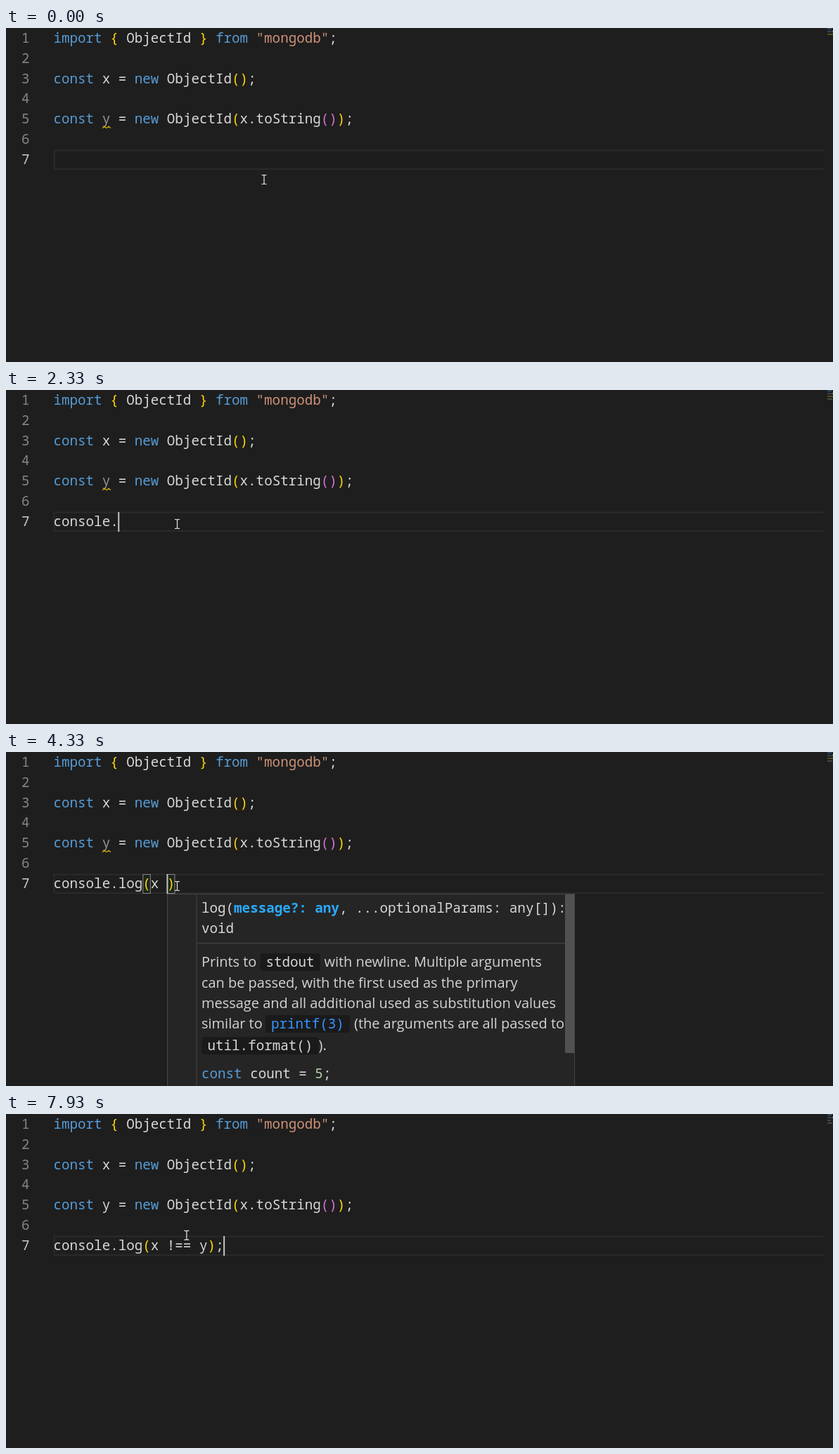
An HTML page for the animation above (8000 ms loop, 1176 by 476 pixels).

```html
<!DOCTYPE html>
<html lang="en">
<head>
<meta charset="utf-8">
<title>Editor session</title>
<style>
html, body { margin: 0; width: 100%; height: 100%; overflow: hidden; background: #1e1e1e; }
svg { display: block; width: 1176px; height: 476px; }
text { white-space: pre; fill: #d4d4d4; }
.mono { font-family: "Noto Sans Mono", "DejaVu Sans Mono", monospace; font-size: 19.22px; font-weight: 500; }
.prose { font-family: "Open Sans", "Noto Sans", sans-serif; font-size: 19.95px; }
.small { font-size: 16.4px; font-weight: 400; }
</style>
</head>
<body>
<svg id="stage" viewBox="0 0 1176 476"></svg>
<script>
const FPS = 15, FRAMES = 120, LEFT = 67.5, CHAR = 11.53, ROW = 28.8;
const FG = '#d8d8d8', BLUE = '#569cd6', GOLD = '#ffd700', PINK = '#da70d6',
      STRING = '#ce9178', MATCH = '#2aaaff', PANEL = '#252526', EDGE = '#454545', THUMB = '#515151';

// [frame, text of line 7]
const typed = [[0, ''], [20, 'c'], [22, 'co'], [24, 'con'], [27, 'cons'], [30, 'conso'],
  [32, 'consol'], [33, 'console'], [35, 'console.'], [40, 'console.l'], [43, 'console.lo'],
  [44, 'console.log'], [49, 'console.log()'], [58, 'console.log(x)'], [63, 'console.log(x )'],
  [71, 'console.log(x !)'], [75, 'console.log(x !=)'], [77, 'console.log(x !==)'],
  [78, 'console.log(x !== )'], [82, 'console.log(x !== y)'], [100, 'console.log(x !== y);']];

// [frame, column the open panel hangs from], 0 = closed
const panels = [[0, 0], [23, 2], [25, 3], [28, 4], [31, 5], [33, 7], [34, 0], [37, 8], [41, 9],
  [45, 11], [49, 0], [51, 12], [60, 13], [65, 14], [72, 15], [76, 16], [79, 18], [83, 19],
  [93, 20], [97, 0]];

const mouseSteps = [[0, [367, 216]], [1, [335, 211]], [2, [300, 206]], [3, [268, 201]],
  [7, [255, 196]], [8, [243.5, 191]]];

const globals = [['console', 'variable'], ['const', 'keyword'], ['ConstantSourceNode', 'variable'],
  ...['ConnectionCheckOutStartedEvent', 'ConnectionClosedEvent', 'CommandStartedEvent',
    'CommandSucceededEvent', 'ConnectionPoolClosedEvent'].map(s => [s, 'class', 'mongodb']),
  ['CountQueuingStrategy', 'variable'], ['useContextSnippet', 'snippet', 'useContext']];

const members = ['log', 'timeLog', 'clear', 'table', 'dirxml', 'profile', 'profileEnd', 'timeline',
  'groupCollapsed', 'assert', 'count', 'debug'].map(s => [s, 'method']);

const iconColor = { variable: '#75beff', keyword: '#c5c5c5', class: '#ee9d28',
  snippet: '#c5c5c5', method: '#b180d7' };
const iconPath = {
  variable: 'M-5-6H-9V6H-5M5-6H9V6H5M-5-1L1-4L5-2V2L-1 5L-5 3ZM-5-1L-1 1L5-2M-1 1V5',
  keyword: 'M-9-6H0M3-6H9M-9-2H2M5-2H9M-9 2H-3M0 2H9M-9 6H4M7 6H9',
  class: 'M-9-3L-3-9L1-5L-5 1ZM-3-1H3M0-1V6H3M3-1L6-4L9-1L6 2ZM3 6L6 3L9 6L6 9Z',
  snippet: 'M-8-8H8V8H-8Z',
  method: 'M0-9L8-5V4L0 9L-8 4V-5ZM-8-5L0-1L8-5M0-1V9'
};

const at = (list, n) => list.filter(e => e[0] <= n).pop()[1];
const colX = col => LEFT + col * CHAR;
const baseline = line => 21 + (line - 1) * ROW;
const rect = (x, y, w, h, fill, more = '') =>
  `<rect x="${x}" y="${y}" width="${w}" height="${h}" fill="${fill}" ${more}/>`;
const box = (x, y, w, h) => rect(x, y, w, h, PANEL, `stroke="${EDGE}"`);
const path = (d, color, w = 1.5) => `<path d="${d}" fill="none" stroke="${color}" stroke-width="${w}"/>`;
const group = (x, y, body) => `<g transform="translate(${x} ${y})">${body}</g>`;
const prose = (x, y, s) => `<text class="prose" x="${x}" y="${y}">${s}</text>`;

// runs: [text, colour, bold]
function mono(x, y, ...runs) {
  const spans = runs.map(([s, color = FG, bold]) =>
    `<tspan style="fill:${color}"${bold ? ' font-weight="700"' : ''}>${s}</tspan>`);
  return `<text class="mono" x="${x}" y="${y}">${spans.join('')}</text>`;
}

function chip(x, y, s, color) {
  return rect(x - 8, y - 19, s.length * CHAR + 16, 25, '#1a1a1b', 'rx="4"') + mono(x, y, [s, color]);
}

function squiggle(x, y, w, color) {
  let d = `M${x} ${y + 1.3}`;
  for (let i = 1; i * 3 <= w; i++) d += `L${x + i * 3} ${y + (i % 2 ? -1.3 : 1.3)}`;
  return path(d, color, 1.2);
}

// Splits a label into runs, marking the letters that match the typed word in order.
function fuzzy(label, word) {
  let k = 0;
  const runs = [];
  for (const ch of label) {
    const hit = k < word.length && ch.toLowerCase() === word[k];
    if (hit) k++;
    const last = runs[runs.length - 1];
    if (last && last[2] === hit) last[0] += ch;
    else runs.push([ch, hit ? MATCH : FG, hit]);
  }
  return k === word.length ? runs : null;
}

function suggestions(x, items, word) {
  const rows = items.map(([label, kind, detail]) => ({ runs: fuzzy(label, word), kind, detail }))
    .filter(r => r.runs);
  let s = box(x, 202.5, 565, rows.length * ROW + 4.5) + rect(x + .5, 203, 564, 29, '#04395e');
  rows.forEach((r, i) => {
    const y = 224 + i * ROW;
    s += group(x + 13.5, y - 6.5, path(iconPath[r.kind], i ? iconColor[r.kind] : '#fff'));
    s += mono(x + 29.5, y, ...r.runs);
    if (r.detail) s += `<text class="mono small" x="${x + 551}" y="${y}" text-anchor="end"
      style="fill:#a0a0a0">${r.detail}</text>`;
  });
  if (rows.length > 9) s += rect(x + 552, 203, 13, 176, THUMB);
  return s;
}

function consoleDocs(x) {
  const dot = y => `<circle cx="16.5" cy="${y}" r="4" fill="${FG}"/>`;
  return group(x, 0, box(0, -5, 434.5, 490) + rect(421, 0, 13, 126, THUMB) +
    prose(7, 22.5, 'The') + chip(55.5, 22.5, 'console') + prose(150.5, 22.5, 'module provides a simple') +
    prose(7, 52.5, 'debugging console that is similar to the') +
    prose(7, 81.5, 'JavaScript console mechanism provided by') +
    prose(7, 110.5, 'web browsers.') +
    prose(7, 160.5, 'The module exports two specific') +
    prose(7, 189.5, 'components:') +
    dot(233) + prose(33.5, 239.5, 'A') + chip(60.5, 239.5, 'Console') +
    prose(157, 239.5, 'class with methods such as') +
    chip(42.5, 270, 'console.log()') + prose(201, 270, ',') + chip(219.5, 270, 'console.error()') +
    prose(33.5, 300.5, 'and') + chip(76.5, 300.5, 'console.warn()') +
    prose(252.5, 300.5, 'that can be used') +
    prose(33.5, 331, 'to write to any Node.js stream.') +
    dot(354) + prose(33.5, 360.5, 'A global') + chip(125.5, 360.5, 'console') +
    prose(220.5, 360.5, 'instance configured') +
    prose(33.5, 391, 'to write to') + chip(144.5, 391, 'process.stdout') + prose(320, 391, 'and') +
    chip(42.5, 421.5, 'process.stderr') + prose(211.5, 421.5, '. The global') +
    chip(333.5, 421.5, 'console') +
    prose(33.5, 452, 'can be used without') +
    prose(33.5, 481, 'calling') + chip(102.5, 481, "require('console')") + prose(318, 481, '.'));
}

function logDocs(x) {
  const grey = '#a0a0a0';
  return box(x, 202.5, 500, 80.5) +
    mono(x + 8.5, 229, ['(method) Console.log(...data: any', grey]) +
    mono(x + 8.5, 258, ['[]): void (+1 overload)', grey]) +
    path(`M${x + 412} 216l8 8m0-8l-8 8`, FG);
}

function paramHint(x) {
  return group(x, 0, box(0, 202.5, 579, 290) +
    path('M41.5 203V476M41.5 272.5H566', EDGE, 1) + rect(565.5, 203, 13, 226, THUMB) +
    mono(48.5, 229, ['log('], ['message?: any', MATCH, true], [', ...optionalParams: any[]):']) +
    mono(48.5, 258, ['void']) +
    prose(48.5, 306, 'Prints to') + chip(140, 306, 'stdout') +
    prose(223, 306, 'with newline. Multiple arguments') +
    prose(48.5, 336, 'can be passed, with the first used as the primary') +
    prose(48.5, 365, 'message and all additional used as substitution values') +
    prose(48.5, 394, 'similar to') + chip(147.5, 394, 'printf(3)', '#3794ff') +
    prose(265.5, 394, '(the arguments are all passed to') +
    chip(57, 425, 'util.format()') + prose(215, 425, ').') +
    mono(48.5, 464.5, ['const', BLUE], [' count = '], ['5', '#b5cea8'], [';']));
}

function code(n, text) {
  const y = n < 88 ? '#959595' : FG;
  const lines = {
    1: [['import ', BLUE], ['{ ', GOLD], ['ObjectId '], ['} ', GOLD], ['from ', BLUE], ['"mongodb"', STRING], [';']],
    3: [['const ', BLUE], ['x = '], ['new ', BLUE], ['ObjectId'], ['()', GOLD], [';']],
    5: [['const ', BLUE], ['y', y], [' = '], ['new ', BLUE], ['ObjectId'], ['(', GOLD], ['x.toString'],
      ['()', PINK], [')', GOLD], [';']],
    7: text.split(/([()])/).map(s => [s, /[()]/.test(s) ? GOLD : FG])
  };
  let s = '';
  for (let i = 1; i <= 7; i++) {
    s += mono(22, baseline(i), [i, i === 7 ? '#c6c6c6' : '#858585']);
    if (lines[i]) s += mono(LEFT, baseline(i), ...lines[i]);
  }
  return s;
}

function minimap(n) {
  const bar = (y, w, color) => rect(1168, y, w, 1.3, color, 'opacity=".5"');
  return bar(.5, 6, BLUE) + bar(4.5, 5, BLUE) + rect(1174, 4.5, 2, 1.3, '#777') +
    bar(8.5, n < 76 ? 8 : 5, n < 76 ? '#cca700' : BLUE) + (n >= 20 ? bar(12.2, 7, '#999') : '');
}

function mouse(n) {
  let [x, y] = at(mouseSteps, n);
  if (n >= 108) {
    const a = (180 - (n - 107) * 25.75) * Math.PI / 180;
    x = 279.5 + 36 * Math.cos(a);
    y = 189.5 + 21.5 * Math.sin(a);
  }
  return group(x, y, path('M-3.5-6.5H-1L0-5.5L1-6.5H3.5M0-5.5V5.5M-3.5 6.5H-1L0 5.5L1 6.5H3.5', '#e6e6e6', 1.2));
}

function scene(n) {
  const text = at(typed, n), col = at(panels, n);
  const caret = n >= 49 && n < 92 ? text.length - 1 : text.length;
  let s = path('M1162 174.5H68.5V201H1162', '#2a2a2a', 2);
  if (n >= 49 && n < 100) {
    for (const c of [11, text.length - 1])
      s += rect(colX(c) + .5, 174.5, 10.5, 27, '#1c251c', 'stroke="#888"');
  }
  s += code(n, text) + minimap(n);
  if (n < 76) s += squiggle(137, 141.5, 12, '#cca700');
  if (n >= 37 && n < 50) s += squiggle(colX(8), 199.8, 12, '#f14c4c');
  if (n >= 79 && n < 82) s += squiggle(259.5, 199.8, 12, '#f14c4c');
  if (n >= 11 && (n < 108 || n > 115)) s += rect(colX(caret) - .5, 174, 2, 28, '#c4c4c0');
  if (col) {
    const x = Math.ceil(colX(col) - .2) + .5;
    const word = text.slice(0, col).split('.').pop();
    if (n < 35) s += suggestions(x, globals, word) + consoleDocs(x + 565);
    else if (n < 49) s += suggestions(x, members, word) + (word ? logDocs(x + 565) : '');
    else s += paramHint(x);
  }
  return s + mouse(n);
}

const stage = document.getElementById('stage');
let start = null, shown = -1;
function tick(now) {
  if (start === null) start = now;
  const n = Math.floor((now - start + 3.5) * FPS / 1000) % FRAMES;
  if (n !== shown) stage.innerHTML = scene(shown = n);
  requestAnimationFrame(tick);
}
stage.innerHTML = scene(0);
requestAnimationFrame(tick);
</script>
</body>
</html>
```
